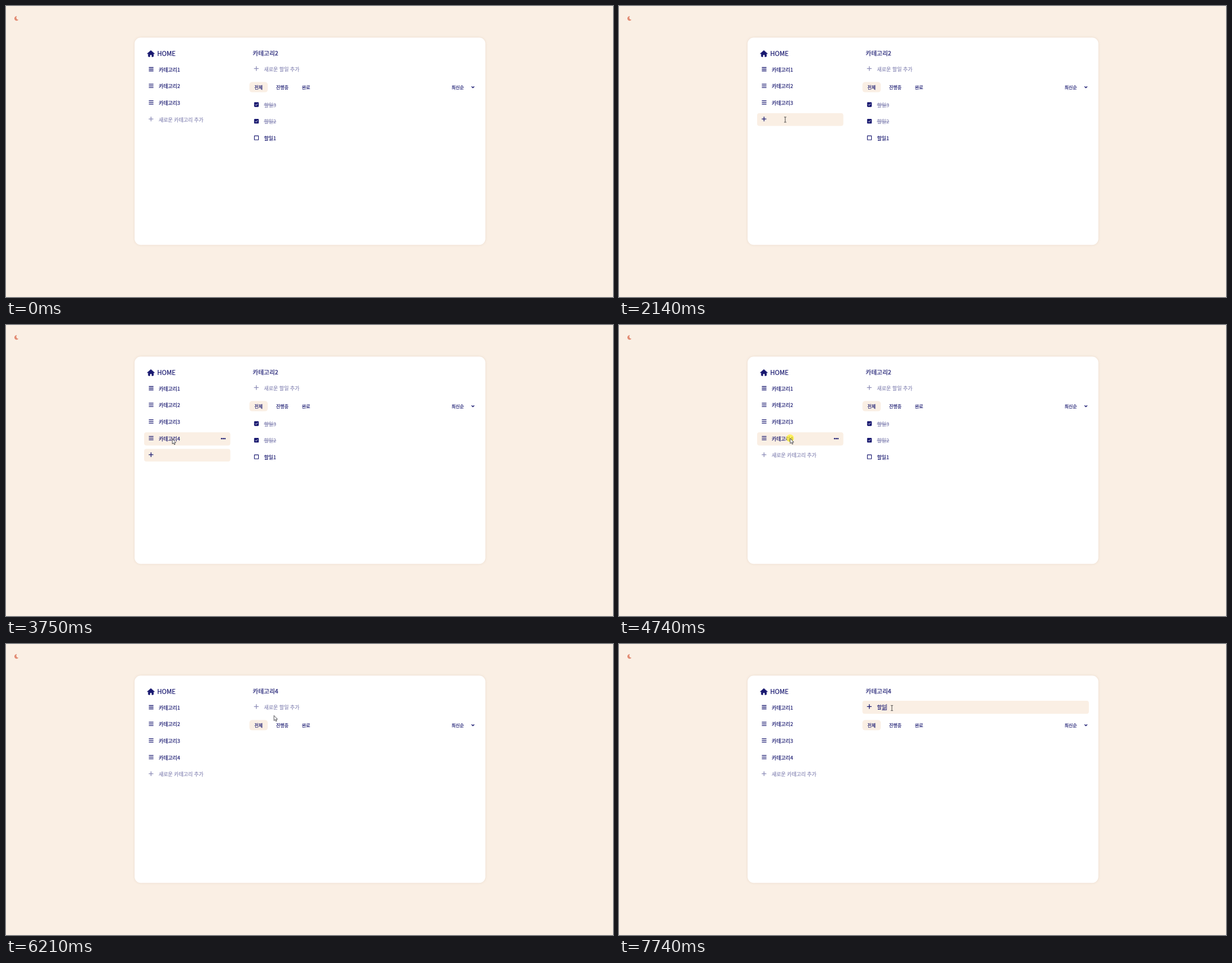
These frames come from a looping animation (1081x518 px, 8 s). An HTML page:

```html
<!DOCTYPE html>
<html lang="ko">
<head>
<meta charset="utf-8">
<title>Todo</title>
<style>
  html, body { margin: 0; width: 100%; height: 100%; overflow: hidden; background: #faefe4; }
  svg { display: block; width: 1081px; height: 518px; }
  text { font: 400 9px "Noto Sans CJK KR", "Noto Sans CJK", sans-serif; fill: #191970; stroke: #191970; stroke-width: .22px; white-space: pre; }
  .title { font-size: 10.75px; }
  .home { font-size: 11.4px; }
  .tab { font-size: 8px; }
  .done { opacity: .5; text-decoration: line-through; }
  .line { fill: none; stroke: #191970; stroke-width: 1.3; }
  .ink { fill: #191970; }
  .bg { fill: #faefe4; }
  .card { fill: #fff; filter: drop-shadow(0 0 2px rgba(90, 50, 20, .1)); }
</style>
</head>
<body>
<svg id="stage" viewBox="0 0 1081 518">
  <path d="M19.4 18A4.1 4.1 0 1 0 22.2 24.6A3.9 3.9 0 0 1 19.4 18Z" fill="#e28b73"/>
  <rect class="card" x="229" y="56.3" width="624.7" height="369" rx="11"/>
  <path class="ink" d="M258 78.9L264.8 85.1H262.8V89.3Q262.8 90.4 261.7 90.4H259.6V87H256.4V90.4H254.3Q253.2 90.4 253.2 89.3V85.1H251.2Z" stroke="#191970" stroke-width=".4" stroke-linejoin="round"/>
  <text class="home" x="269.2" y="89.2">HOME</text>
  <rect class="bg" x="433.5" y="135.3" width="32.7" height="18.3" rx="5"/>
  <text class="tab" x="442.5" y="147.6">전체</text>
  <text class="tab" x="481" y="147.6">진행중</text>
  <text class="tab" x="527" y="147.6">완료</text>
  <text class="tab" x="793.5" y="147.6">최신순</text>
  <path class="line" d="M829.2 143.2L831.5 145.5L833.8 143.2" style="stroke-width:1.5"/>
</svg>
<script>
const LOOP = 8000;
const stage = document.getElementById('stage');

function add(tag, attrs, parent = stage, label) {
  const el = document.createElementNS('http://www.w3.org/2000/svg', tag);
  for (const key in attrs) el.setAttribute(key, attrs[key]);
  if (label) el.textContent = label;
  return parent.appendChild(el);
}
const show = (el, on) => { el.style.display = on ? '' : 'none'; };
const move = (el, x, y) => el.setAttribute('transform', `translate(${x} ${y})`);
const within = (t, a, b) => t >= a && t < b;

// Cursor moves: start, end, steps, from x, y, to x, y
const moves = [
  [70, 670, 10, 986, 490, 293, 210],
  [870, 940, 2, 293, 209, 293.8, 208],
  [1270, 1340, 2, 295, 204, 296, 202.3],
  [4410, 4610, 4, 299, 202, 304.7, 201.5],
  [5140, 5210, 2, 340, 206, 362, 209],
  [5940, 6210, 5, 374, 203, 477, 127],
  [6280, 6420, 3, 481, 121, 486, 114]
];

// Typed text: time, value, whether the last syllable is being composed
const categoryKeys = [
  [2340, 'ㅋ', 1], [2410, '카', 1], [2540, '캍', 1], [2610, '카테', 1],
  [2740, '카텍', 1], [2810, '카테고', 1], [2940, '카테골', 1],
  [3000, '카테고리', 1], [3200, '카테고리4', 0]
];
const todoKeys = [
  [7150, 'ㅎ', 1], [7350, '하', 1], [7420, '할', 1],
  [7540, '할ㅇ', 1], [7610, '할이', 1], [7740, '할일', 1]
];
const clicks = [[1540, 1680], [4740, 4810], [6560, 6680]];

function last(list, t) {
  let found = null;
  for (const item of list) if (t >= item[0]) found = item;
  return found;
}

function cursorAt(t) {
  const m = last(moves, t);
  if (!m) return null;
  const [t0, t1, n, x0, y0, x1, y1] = m;
  const k = Math.min(Math.floor((t - t0) / (t1 - t0) * (n - 1) + 1e-6), n - 1);
  const p = 1 - (1 - k / (n - 1)) ** 2;
  return { x: x0 + (x1 - x0) * p, y: y0 + (y1 - y0) * p };
}

function category(i) {
  const g = add('g', {});
  const y = 113 + i * 29.6;
  const bg = add('rect', { class: 'bg', x: 246, y: y - 10.8, width: 153.5, height: 23.4, rx: 4 }, g);
  const c = y - .5;
  add('path', { class: 'line', d: `M254.4 ${c - 3}h8.2M254.4 ${c}h8.2M254.4 ${c + 3}h8.2` }, g);
  add('text', { x: 272, y: y + 3.8 }, g, '카테고리' + (i + 1));
  const dots = add('g', { class: 'ink' }, g);
  for (const x of [384, 386.9, 389.8]) add('circle', { cx: x, cy: y + .4, r: 1.25 }, dots);
  return { g, setHover(on) { show(bg, on); show(dots, on); } };
}

// An input row, drawn around its text start
function field(label, left, width, height) {
  const g = add('g', {});
  const bg = add('rect', { class: 'bg', x: left, y: -11, width, height, rx: 4 }, g);
  const plus = add('path', { class: 'line', d: 'M-17.8 -.6h8.2M-13.7 -4.7v8.2' }, g);
  const hint = add('text', { x: 0, y: 3.7 }, g, label);
  const value = add('text', { x: 0, y: 3.7 }, g);
  const under = add('rect', { class: 'ink', y: 5.1, height: .7 }, g);
  const caret = add('rect', { class: 'ink', y: -5, width: .8, height: 10.8 }, g);
  return {
    g,
    update(hover, focus, key, caretOn) {
      const typed = key ? key[1] : '';
      const lit = hover || focus;
      show(bg, lit);
      plus.style.opacity = lit ? 1 : .5;
      hint.style.opacity = lit ? 1 : .5;
      show(hint, !focus);
      if (value.textContent !== typed) value.textContent = typed;
      const end = typed ? value.getComputedTextLength() : 0;
      show(under, key && key[2]);
      under.setAttribute('x', end - 8);
      under.setAttribute('width', 7.8);
      show(caret, focus && caretOn);
      caret.setAttribute('x', end);
    }
  };
}

const rows = [0, 1, 2, 3].map(category);
rows.forEach(r => r.setHover(false));
const title = add('text', { class: 'title', x: 439.3, y: 88 });

const todos = add('g', {});
['할일3', '할일2', '할일1'].forEach((label, i) => {
  const y = 175.5 + i * 29.6, done = i < 2;
  add('rect', {
    x: 442.4, y: y - 3.6, width: 7.2, height: 7.2, rx: done ? .8 : .3,
    fill: done ? '#191970' : 'none', stroke: '#191970', 'stroke-width': 1.1
  }, todos);
  if (done) add('path', { d: `M443.9 ${y}l1.5 1.5l2.8 -2.9`, fill: 'none', stroke: '#fff', 'stroke-width': 1 }, todos);
  add('text', { class: done ? 'done' : '', x: 459.5, y: y + 4.2 }, todos, label);
});

const newCategory = field('새로운 카테고리 추가', -26, 153.5, 22.7);
const newTodo = field('새로운 할일 추가', -26, 403.3, 23.3);
move(newTodo.g, 459.5, 112);

const glow = add('circle', { r: 6.8, fill: '#fff02a', opacity: .72 });
const arrow = add('path', {
  d: 'M.2 .3V9.4L2.3 7.5L3.7 10.7L5.2 10L3.8 7H6.5Z',
  fill: '#fff', stroke: '#26262e', 'stroke-width': .8, 'stroke-linejoin': 'round'
});
const beam = add('path', {
  d: 'M-2 -4.6H-.5L0 -4.2L.5 -4.6H2M0 -4.2V4.2M-2 4.6H-.5L0 4.2L.5 4.6H2',
  fill: 'none', stroke: '#333', 'stroke-width': .9
});

function render(t) {
  const pos = cursorAt(t);
  const over = (x0, y0, x1, y1) => !!pos && within(pos.x, x0, x1) && within(pos.y, y0, y1);
  const added = t >= 3480, opened = t >= 4810;
  const onFourth = over(246, 191, 399.5, 214.5);

  show(rows[3].g, added);
  rows[3].setHover(added && onFourth);
  title.textContent = opened ? '카테고리4' : '카테고리2';
  show(todos, !opened);

  move(newCategory.g, 272, added ? 231.4 : 201.8);
  newCategory.update(
    !added && onFourth,
    within(t, 1610, 4740),
    added ? null : last(categoryKeys, t),
    !within(t, 2140, 2340) && !within(t, 3750, 4280)
  );
  newTodo.update(
    over(433.5, 101, 837, 124),
    t >= 6610,
    last(todoKeys, t),
    !within(t, 7080, 7150)
  );

  const text = (t < 3550 && over(272, 196, 395, 207.5)) || over(459, 106, 830, 119);
  show(arrow, pos && !text);
  show(beam, pos && text);
  show(glow, pos && clicks.some(([a, b]) => within(t, a, b)));
  if (pos) for (const el of [arrow, beam, glow]) move(el, pos.x, pos.y);
}

const start = performance.now();
function tick() {
  render((performance.now() - start) % LOOP);
  requestAnimationFrame(tick);
}
tick();
</script>
</body>
</html>
```
